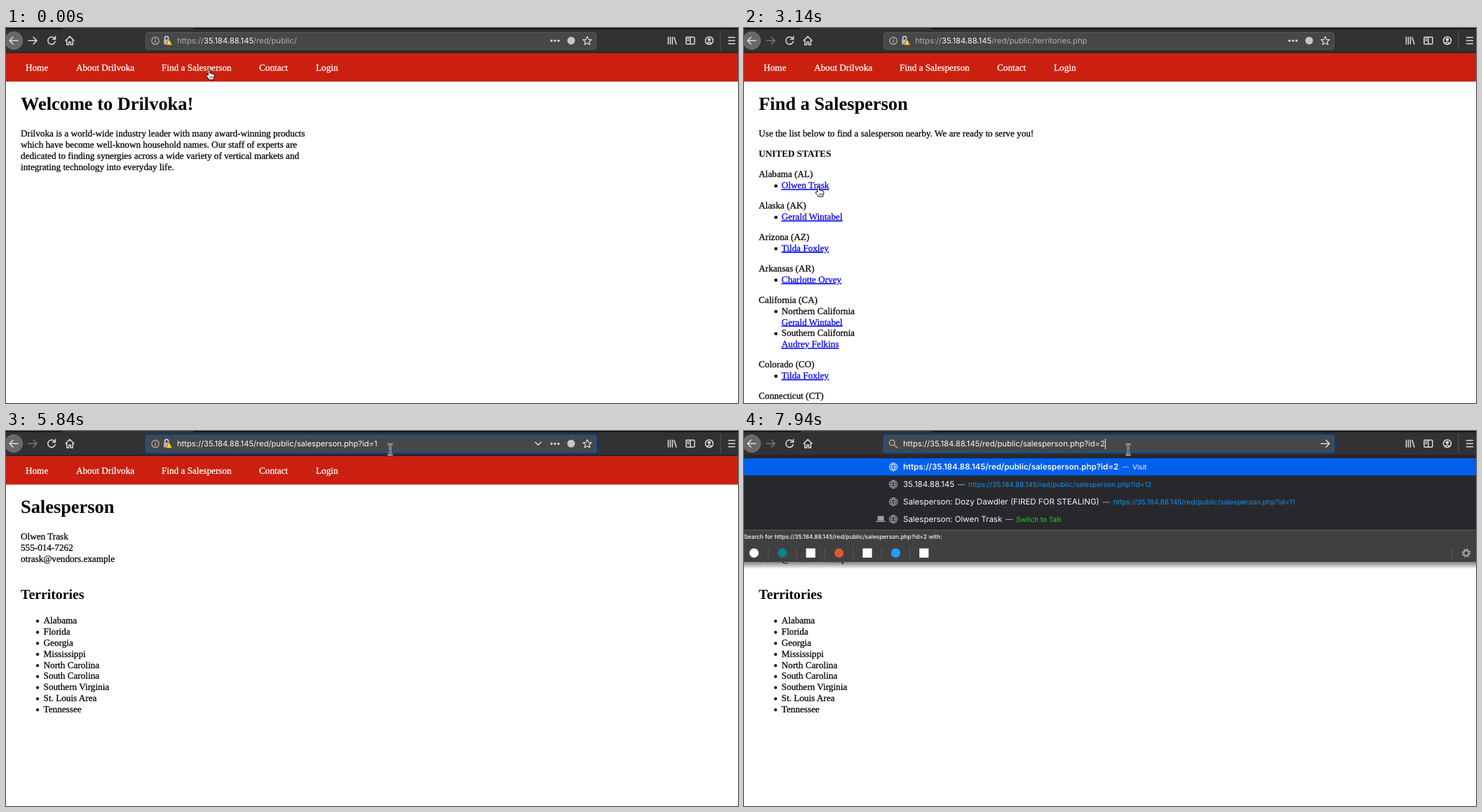
An HTML page for the animation above (8000 ms loop, 1044 by 536 pixels).

```html
<!DOCTYPE html>
<html lang="en">
<head>
<meta charset="utf-8">
<style>
  html, body { margin: 0; width: 100%; height: 100%; overflow: hidden; background: #fff; }
  svg { display: block; width: 1044px; height: 536px; }
  text { text-rendering: geometricPrecision; }
  .serif { font: 13.2px "Liberation Serif", serif; stroke-width: .25px; }
  .ui { font: 11.2px Inter, sans-serif; }
  .line { fill: none; stroke: #dcdcde; stroke-width: 1.5; stroke-linecap: round; stroke-linejoin: round; }
</style>
</head>
<body>
<svg viewBox="0 0 1044 536"><g id="scene"></g><g id="cursor"></g></svg>
<script>
const LOOP = 8000, LINE = 15.84, GAP = 13.2;
const HOST = '35.184.88.145', PATHS = ['', 'territories.php', 'salesperson.php?id='];
const COMPANY = 'Drilvoka', PERSON = 'Olwen Trask';
const sceneNode = document.getElementById('scene');
const cursorNode = document.getElementById('cursor');

const text = (s, x, y, attrs = '') => `<text x="${x}" y="${y}" ${attrs}>${s}</text>`;
const rect = (x, y, w, h, fill, attrs = '') =>
  `<rect x="${x}" y="${y}" width="${w}" height="${h}" fill="${fill}" ${attrs}/>`;
const disc = (x, y, r, fill, attrs = '') => `<circle cx="${x}" cy="${y}" r="${r}" fill="${fill}" ${attrs}/>`;
const icon = (x, y, d, attrs = '') => `<path class="line" transform="translate(${x} ${y})" d="${d}" ${attrs}/>`;
const ARROW = 'M-6 0H6M1 -5L6 0L1 5';
const heading = (s, y = 116.8, size = 26.4) =>
  text(s, 21, y, `font-size="${size}" font-weight="bold" stroke="none"`);
const lines = (list, y, x = 21) => list.map((s, i) => text(s, x, y + i * LINE)).join('');

// Pages

function home() {
  return heading(`Welcome to ${COMPANY}!`) + lines([
    `${COMPANY} is a world-wide industry leader with many award-winning products`,
    'which have become well-known household names. Our staff of experts are',
    'dedicated to finding synergies across a wide variety of vertical markets and',
    'integrating technology into everyday life.'], 155.2);
}

function territories() {
  const link = 'fill="#0000ee" stroke="#0000ee" text-decoration="underline"';
  const north = 'Gerald Wintabel', west = 'Tilda Foxley';
  const states = [
    ['Alabama (AL)', PERSON], ['Alaska (AK)', north], ['Arizona (AZ)', west],
    ['Arkansas (AR)', 'Charlotte Orvey'],
    ['California (CA)', north, 'Northern California', 'Audrey Felkins', 'Southern California'],
    ['Colorado (CO)', west], ['Connecticut (CT)']];
  let y = 213.3, out = '';
  for (const [state, ...reps] of states) {
    out += text(state, 21, y);
    for (let i = 0; i < reps.length; i += 2) {
      y += LINE;
      out += rect(43.5, y - 5.4, 4, 4, '#000', 'stroke="none"');
      if (reps[i + 1]) {
        out += text(reps[i + 1], 53.6, y);
        y += LINE;
      }
      out += text(reps[i], 53.6, y, link);
    }
    y += LINE + GAP;
  }
  return heading('Find a Salesperson') +
    text('Use the list below to find a salesperson nearby. We are ready to serve you!', 21, 155.2) +
    text('UNITED STATES', 21, 184.2, 'font-weight="bold" stroke="none"') + out;
}

function salesperson() {
  const areas = ['Alabama', 'Florida', 'Georgia', 'Mississippi', 'North Carolina', 'South Carolina',
    'Southern Virginia', 'St. Louis Area', 'Tennessee'];
  return heading('Salesperson') + lines([PERSON, '555-014-7262', 'otrask@vendors.example'], 155.2) +
    heading('Territories', 240.4, 19.8) + lines(areas, 275.2, 53.6) +
    areas.map((_, i) => disc(45, 271.8 + i * LINE, 2, '#000')).join('');
}

function nav() {
  const items = [['Home', 28], [`About ${COMPANY}`, 100], ['Find a Salesperson', 222], ['Contact', 361], ['Login', 442]];
  return rect(0, 35.5, 1044, 41.1, '#cb200f', 'stroke="none"') +
    items.map(([s, x]) => text(s, x, 60.7, 'fill="#fff" stroke="#fff"')).join('');
}

// Browser chrome

function toolbar({ page, focus, typing }) {
  let out = rect(0, 0, 1044, 35.5, '#323234') + rect(0, 0, 81, 1.5, '#0c0c0d') + rect(267, 0, 777, 1.5, '#0c0c0d') +
    rect(0, 34.7, 1044, 1, '#0c0c0d') +
    disc(11, 18, 12.5, '#68686a', 'stroke="#7c7c7e"') + icon(11, 18, 'M6 0H-6M-1 -5L-6 0L-1 5') +
    icon(38, 18, ARROW, page ? 'opacity=".4"' : '') +
    icon(65, 18, 'M4 -3.5A5.3 5.3 0 1 0 5.2 1.2M5.5 -6V-2H1.5') +
    icon(91, 18, 'M-6 0L0 -6L6 0M-4.2 0V6H-1.3V2H1.3V6H4.2V0') +
    icon(950, 18, 'M-5.5 -5V5M-2.5 -5V5M.5 -5V5M3 -4.5L6 5') +
    icon(976, 18, 'M-5 -5H5Q6 -5 6 -4V4Q6 5 5 5H-5Q-6 5 -6 4V-4Q-6 -5 -5 -5ZM0 -5V5M-4 -2.5H-2M-4 0H-2') +
    icon(1003, 18, 'M-5.5 0A5.5 5.5 0 1 0 5.5 0A5.5 5.5 0 1 0 -5.5 0M-3.2 4Q0 .5 3.2 4') + disc(1003, 16.5, 2.3, '#dcdcde') +
    rect(1018.5, 4, 1, 28, '#555557') + icon(1035, 18, 'M-4.5 -4.5H4.5M-4.5 0H4.5M-4.5 4.5H4.5') +
    rect(199.5, 6.5, 642, 24, '#474749', `rx="3" stroke="${focus ? '#0a56b0' : '#5a5a5c'}" stroke-width="${focus ? 2 : 1}"`);
  if (typing) return out + icon(213, 18, 'M2 -1.2A3.8 3.8 0 1 0 -5.6 -1.2A3.8 3.8 0 1 0 2 -1.2M1 1.6L5.5 6', 'opacity=".65"') +
    icon(829, 18, ARROW);
  out += disc(213, 18.3, 5.2, 'none', 'stroke="#b8b8ba" stroke-width="1.2"') +
    rect(212.4, 17.3, 1.3, 4, '#b8b8ba') + rect(212.4, 15, 1.3, 1.3, '#b8b8ba') +
    icon(229, 17, 'M-2.5 0V-2.5A2.5 2.5 0 0 1 2.5 -2.5V0') + rect(225, 16.5, 8.5, 7, '#b8b8ba', 'rx="1"') +
    '<path d="M232.5 16L237.3 24.5H227.7Z" fill="#ffbf00" stroke="#474749" stroke-width=".6"/>' +
    rect(232, 18.6, 1.1, 3, '#fff') + rect(232, 22.3, 1.1, 1.1, '#fff') +
    [-5, 0, 5].map(d => disc(783 + d, 18.2, 1.6, '#dcdcde')).join('') + disc(806, 18, 5.5, '#c6c6c8') +
    icon(829, 18.3, 'M0 -6L1.8 -2L6 -1.6L2.8 1.2L3.8 5.4L0 3.2L-3.8 5.4L-2.8 1.2L-6 -1.6L-1.8 -2Z', 'style="stroke-width:1.2"');
  return focus ? out + icon(759, 18, 'M-4 -2L0 2L4 -2') : out;
}

function address({ page, focus, typing, id, selected, caret }) {
  const dim = focus ? '#f9f9fa' : '#b1b1b3';
  const url = `https://<tspan fill="#f9f9fa">${HOST}</tspan>/red/public/${PATHS[page]}${page === 2 ? id : ''}`;
  const x = typing ? 227 : 244;
  return (selected ? rect(x, 11, 0, 15, '#3f638b', 'id="selection"') : '') +
    text(url, x, 22.3, `id="url" fill="${dim}"`) +
    (caret ? rect(x, 11, 1, 15, '#f9f9fa', 'id="caret"') : '');
}

function suggestions(id) {
  const base = `https://${HOST}/red/public/${PATHS[2]}`, blue = '#1292ee';
  const rows = [[base + id, 'Visit', '#fff']];
  if (id) rows.push([HOST, base + 12, blue],
    ['Salesperson: Dozy Dawdler (FIRED FOR STEALING)', base + 11, blue],
    [`Salesperson: ${PERSON}`, 'Switch to Tab', '#14dc14']);
  const foot = 42 + rows.length * 24.8;
  let out = '<defs><linearGradient id="shade" x2="0" y2="1"><stop stop-opacity=".5"/><stop offset="1" stop-opacity="0"/></linearGradient></defs>' +
    rect(0, foot + 46, 1044, 10, 'url(#shade)') + rect(0, 35.5, 1044, foot - 35.5, '#28282c') + rect(0, 39, 1044, 24.5, '#0060ed') +
    rect(0, foot, 1044, 46, '#404043') + rect(0, foot, 1044, 1, '#57575a');
  rows.forEach(([title, note, color], i) => {
    const y = 51.3 + i * 24.9;
    out += icon(213, y, 'M-5.7 0A5.7 5.7 0 1 0 5.7 0A5.7 5.7 0 1 0 -5.7 0H5.7M0 -5.7Q-5.4 0 0 5.7Q5.4 0 0 -5.7M-4.7 -3H4.7M-4.7 3H4.7',
      `style="stroke-width:1" opacity="${i ? .65 : 1}"`) +
      text(`<tspan font-size="11.5" font-weight="${i ? 400 : 600}">${title}</tspan>` +
        `<tspan dx="5" fill="#c4c4c6">—</tspan><tspan dx="5" fill="${color}">${note}</tspan>`,
        227, y + 4, 'fill="#f9f9fa" font-size="10"');
  });
  if (id) out += rect(190.5, 121.5, 9, 6.5, '#a0a0a3', 'rx="1"') + rect(188.5, 128.5, 13, 1.5, '#a0a0a3');
  out += text(`Search for ${base}${id} with:`, 0, foot + 13, 'fill="#f9f9fa" font-size="8.3" font-weight="500"');
  const y = foot + 33.2;
  ['#fff', '#0c8484', '#fff', '#de5833', '#fff', '#1da1f2', '#fff'].forEach((color, i) => {
    const x = 14.3 + i * 40.4;
    out += (i % 2 || !i ? disc(x, y, 6.6, color) : rect(x - 6.6, y - 6.6, 13.2, 13.2, color)) +
      (i < 6 ? rect(x + 19.7, y - 8, 1, 16, '#5a5a5d') : '');
  });
  return out + rect(1009, y - 8, 1, 16, '#5a5a5d') +
    disc(1030, y, 3.6, 'none', 'stroke="#a8a8aa" stroke-width="2"') +
    disc(1030, y, 5.5, 'none', 'stroke="#a8a8aa" stroke-width="1.8" stroke-dasharray="2.16"');
}

// Timeline

const between = (t, a, b) => t >= a && t < b;

function stateAt(t) {
  return {
    page: t < 600 ? 0 : t < 3590 ? 1 : 2,
    focus: t >= 4640,
    typing: t >= 7640,
    popup: t >= 7790,
    id: t < 7640 ? '1' : t < 7940 ? '' : '2',
    selected: between(t, 4790, 5390),
    caret: between(t, 4640, 4790) || between(t, 5390, 5840) || between(t, 6290, 6890) || t >= 7490,
    scrollbar: !between(t, 600, 2240) ? 0 : t < 2090 ? .55 : .25
  };
}

function scene(s) {
  const page = [home, territories, salesperson][s.page]();
  return rect(0, 0, 1044, 536, '#fff') + `<g class="serif" stroke="#000">${page}${nav()}</g>` +
    rect(1043, 37, 1, 82, '#000', `opacity="${s.scrollbar}"`) +
    `<g class="ui">${toolbar(s)}${address(s)}${s.popup ? suggestions(s.id) : ''}</g>`;
}

// Pointer path: time, x, y
const PATH = [[0, 289.5, 60], [590, 289.5, 60], [1190, 237, 146], [1490, 221, 159], [2390, 221, 159],
  [3140, 106, 227], [3290, 106, 227], [4490, 548, 26], [LOOP, 548, 26]];
const HAND = '<path d="M-1.3 1.2A1.3 1.3 0 0 1 1.3 1.2V5C2.3 4.2 3.5 4.5 3.7 5.5C4.7 4.9 5.8 5.3 6 6.3C7 5.9 7.8 6.4 7.8 7.5C7.9 10 7 11 6.6 14H-.2C-.6 12 -2 11 -3.8 8.6C-4.6 7.2 -2.6 6.2 -1.3 8Z" fill="#fff" stroke="#000"/><path d="M1.6 9V12M3.6 9V12M5.5 9V12" stroke="#000" stroke-width=".7"/>';
const POINTER = '<path d="M0 0V12L2.8 9.5L4.7 13.8L6.6 13L4.7 8.8H8.4Z" stroke="#fff" stroke-width=".9"/>';
const BEAM_D = 'M-3.5 -7Q0 -7 0 -5Q0 -7 3.5 -7M0 -5V6M-3.5 8Q0 8 0 6Q0 8 3.5 8M-2 2H2';
const BEAM = `<path d="${BEAM_D}" fill="none" stroke="#fff" stroke-width="2.6"/><path d="${BEAM_D}" fill="none" stroke="#000"/>`;

function pointerAt(t, page) {
  const tick = Math.max(0, Math.floor((t + 10) / 150) * 150 - 10);
  const i = PATH.findIndex(p => p[0] > tick);
  const [t0, x0, y0] = PATH[i - 1], [t1, x1, y1] = PATH[i];
  const u = (tick - t0) / (t1 - t0), e = u * u * (3 - 2 * u);
  const x = x0 + (x1 - x0) * e, y = y0 + (y1 - y0) * e;
  const overLink = between(x, 222, 322) && between(y, 45, 67) || page < 2 && x < 123 && y > 218;
  const shape = overLink ? HAND : y < 36 ? BEAM : POINTER;
  return `<g transform="translate(${x} ${y})">${shape}</g>`;
}

let lastScene, lastPointer;

function draw() {
  const t = performance.now() % LOOP;
  const state = stateAt(t), key = JSON.stringify(state), pointer = pointerAt(t, state.page);
  if (key !== lastScene) {
    lastScene = key;
    sceneNode.innerHTML = scene(state);
    const url = document.getElementById('url'), width = url.getComputedTextLength();
    document.getElementById('selection')?.setAttribute('width', width);
    document.getElementById('caret')?.setAttribute('x', +url.getAttribute('x') + width);
  }
  if (pointer !== lastPointer) cursorNode.innerHTML = lastPointer = pointer;
  requestAnimationFrame(draw);
}
draw();
</script>
</body>
</html>
```
